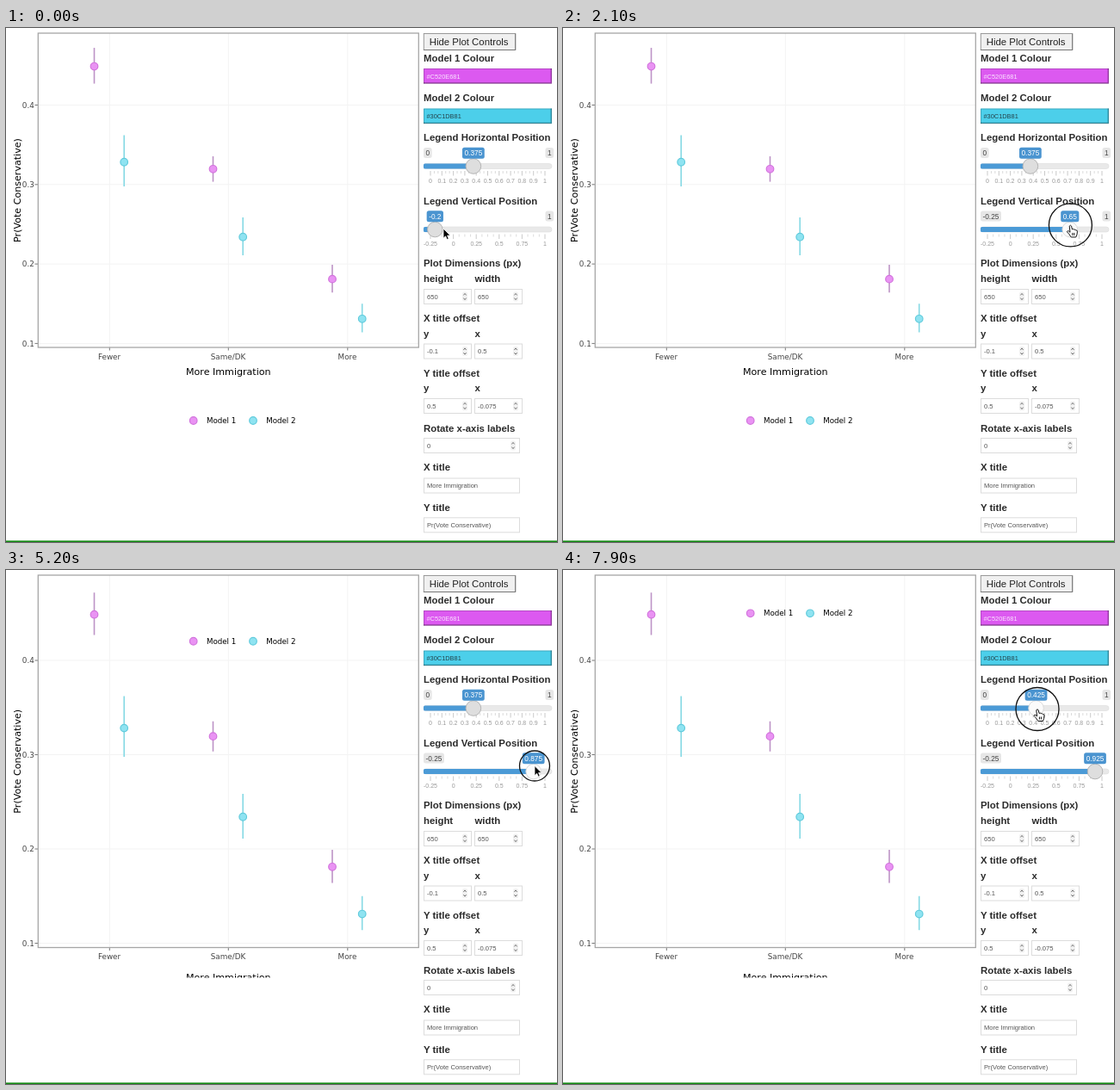
An HTML page for the animation above (8000 ms loop, 640 by 597 pixels).

```html
<!DOCTYPE html>
<html lang="en">
<head>
<meta charset="utf-8">
<title>Plot controls</title>
<style>
  html, body { margin: 0; width: 100%; height: 100%; overflow: hidden; background: #fff; }
  svg { display: block; width: 640px; height: 597px; }
  text { font-family: "Liberation Sans", Arial, sans-serif; }
  .plot text { font-family: "DejaVu Sans", Verdana, sans-serif; }
</style>
</head>
<body>
<svg id="stage" viewBox="0 0 640 597" xmlns="http://www.w3.org/2000/svg"></svg>
<script>
const NS = 'http://www.w3.org/2000/svg';
const LOOP = 8000, STEP = 100;
const stage = document.getElementById('stage');

function set(el, attrs) {
  for (const k in attrs) el.setAttribute(k, attrs[k]);
  return el;
}
function add(parent, tag, attrs) {
  return parent.appendChild(set(document.createElementNS(NS, tag), attrs || {}));
}
const rect = (p, x, y, w, h, fill, more) =>
  add(p, 'rect', { x, y, width: w, height: h, fill, ...more });
const line = (p, x1, y1, x2, y2, stroke, width = 1) =>
  add(p, 'line', { x1, y1, x2, y2, stroke, 'stroke-width': width });
// y is the middle of the capitals
function label(p, str, x, y, size, fill, more) {
  const el = add(p, 'text', { x, y: y + size * 0.36, 'font-size': size, fill, ...more });
  el.textContent = str;
  return el;
}
const MID = { 'text-anchor': 'middle' };
const END = { 'text-anchor': 'end' };
const show = (el, on) => set(el, { visibility: on ? 'visible' : 'hidden' });

// ---------- plot ----------
const CATS = [['Fewer', 120], ['Same/DK', 258], ['More', 396.5]];
const MODELS = [
  { name: 'Model 1', dx: -17.5, key: 217.7, fill: '#e993f3', edge: '#d273dd', bar: '#bd93c6',
    data: [[.4487, .427, .472], [.3195, .3035, .3355], [.181, .164, .199]] },
  { name: 'Model 2', dx: 17.2, key: 287, fill: '#8fe3f1', edge: '#60cbdc', bar: '#86d9e4',
    data: [[.3282, .2977, .362], [.234, .211, .2585], [.131, .114, .150]] }
];

function marker(p, m, x, y) {
  add(p, 'circle', { cx: x, cy: y, r: 4.3, fill: m.fill, stroke: m.edge, 'stroke-width': 1.2 });
}

function makePlot(id, bottom, y4, unit, titleY, cut) {
  const clip = add(stage, 'clipPath', { id });
  rect(clip, 0, 0, 482, cut, '#000');
  const g = add(stage, 'g', { class: 'plot', 'clip-path': `url(#${id})` });
  const yOf = v => y4 - (v - 0.4) * unit;

  for (const [, x] of CATS) line(g, x + .3, 6, x + .3, bottom, '#f3f3f3');
  for (const v of [.1, .2, .3, .4]) {
    const y = yOf(v);
    line(g, 37, y, 479, y, '#f3f3f3');
    line(g, 33.5, y, 37, y, '#777');
    label(g, v.toFixed(1), 32.8, y, 8.8, '#444', END);
  }
  for (const [name, x] of CATS) {
    line(g, x + .3, bottom, x + .3, bottom + 3.5, '#777');
    label(g, name, x, bottom + 10.6, 8.8, '#444', MID);
  }
  rect(g, 37.3, 6, 442, bottom - 6, 'none', { stroke: '#a6a6a6', 'stroke-width': 1.3 });

  for (const m of MODELS) {
    m.data.forEach(([v, lo, hi], i) => {
      const x = CATS[i][1] + m.dx;
      line(g, x, yOf(hi), x, yOf(lo), m.bar, 1.6);
      marker(g, m, x, yOf(v));
    });
  }
  label(g, 'More Immigration', 258.3, titleY, 11.1, '#000', MID);
  const my = (6 + bottom) / 2;
  label(g, 'Pr(Vote Conservative)', 13.3, my, 11.1, '#000',
    { ...MID, transform: `rotate(-90 13.3 ${my})` });
  return g;
}

const tallGap = makePlot('clipA', 371, 89.5, 923, 399, 474);
const overlaid = makePlot('clipB', 438.5, 105, 1095, 472.8, 473.5);

const legend = add(stage, 'g', { class: 'plot' });
for (const m of MODELS) {
  marker(legend, m, m.key, 0);
  label(legend, m.name, m.key + 15.2, 0, 8.7, '#000');
}

// ---------- control panel ----------
const panel = add(stage, 'g');
const heading = (str, y, x = 485) =>
  label(panel, str, x, y, 11.4, '#2b2b2b', { 'font-weight': 'bold' });

function field(x, y, w, str, spin) {
  rect(panel, x + .5, y - 8.5, w - 1, 17, '#fff', { stroke: '#dcdcdc' });
  label(panel, str, x + 4, y + .2, 7.6, '#555');
  if (!spin) return;
  const sx = x + w - 8;
  rect(panel, sx - 3, y - 5.5, 6, 11, '#f1f1f1', { rx: 2 });
  add(panel, 'path', {
    d: `M${sx - 1.6} ${y - 1.6}l1.6 -2 1.6 2M${sx - 1.6} ${y + 1.6}l1.6 2 1.6 -2`,
    fill: 'none', stroke: '#666', 'stroke-width': .9
  });
}

function swatch(title, y, code, fill, ink) {
  heading(title, y);
  rect(panel, 485, y + 12.5, 149, 17.5, fill);
  add(panel, 'path', { d: `M485.5 ${y + 30}V${y + 13}H634`, fill: 'none', stroke: '#000', 'stroke-opacity': .18 });
  add(panel, 'path', { d: `M485 ${y + 29.5}H633.3V${y + 12.5}`, fill: 'none', stroke: '#000', 'stroke-opacity': .35, 'stroke-width': 1.3 });
  label(panel, code, 488.5, y + 21.5, 7.4, ink);
}

rect(panel, 485.3, 6.5, 106.4, 19, '#f0f0f0', { stroke: '#999' });
add(panel, 'path', { d: 'M485 25.5H591.7V6.5', fill: 'none', stroke: '#777' });
label(panel, 'Hide Plot Controls', 491.7, 16.2, 11.4, '#222');
swatch('Model 1 Colour', 34.5, '#C520E681', '#dc59f0', '#fbe6ff');
swatch('Model 2 Colour', 81, '#30C1DB81', '#4ccfea', '#24444c');

heading('Plot Dimensions (px)', 273.3);
heading('X title offset', 337.3);
heading('Y title offset', 400.8);
const pairs = [
  [291.3, 'height', 'width', '650', '650'],
  [354.8, 'y', 'x', '-0.1', '0.5'],
  [418.3, 'y', 'x', '0.5', '-0.075']
];
for (const [y, a, b, va, vb] of pairs) {
  heading(a, y);
  heading(b, y, 544.5);
  field(485, y + 20.7, 56, va, true);
  field(544, y + 20.7, 56, vb, true);
}
heading('Rotate x-axis labels', 464.5);
field(485, 485, 112, '0', true);
heading('X title', 510.3);
field(485, 531.5, 112, 'More Immigration');
heading('Y title', 556.5);
field(485, 577.3, 112, 'Pr(Vote Conservative)');

// ---------- sliders ----------
const widthOf = s => [...s].reduce((w, c) => w + (c === '.' ? .278 : c === '-' ? .333 : .556), 0) * 8.3 + 5;

function tag(x, y, str) {
  const g = add(panel, 'g');
  const w = widthOf(str);
  rect(g, x, y, w, 12, '#e6e6e6', { rx: 2.5 });
  label(g, str, x + w / 2, y + 6.2, 8.3, '#444', MID);
  return g;
}

function makeSlider(title, y, min, step, minors) {
  heading(title, y);
  const mid = y + 33.5, top = y + 12;
  const xOf = v => 493 + 133 * (v - min) / (1 - min);
  const lowStr = String(min), lowEnd = 485 + widthOf(lowStr);
  const low = tag(485, top, lowStr), high = tag(626.5, top, '1');
  rect(panel, 485, mid - 3, 149, 6, '#e9e9e9', { rx: 3, stroke: '#dcdcdc', 'stroke-width': .6 });
  const bar = rect(panel, 485, mid - 3, 10, 6, '#4b9ad6', { rx: 1.5 });

  const count = Math.round((1 - min) / step);
  for (let i = 0; i <= count; i++) {
    const v = min + i * step;
    line(panel, xOf(v), mid + 5.5, xOf(v), mid + 11, '#bbb', .8);
    label(panel, String(+v.toFixed(2)), xOf(v), mid + 16.6, 7, '#999', MID);
    if (i === count) break;
    for (let k = 1; k <= minors; k++) {
      const x = xOf(v + step * k / (minors + 1));
      line(panel, x, mid + 5.5, x, mid + 8.5, '#ccc', .7);
    }
  }
  const knob = add(panel, 'circle', { cy: mid, r: 8.8, 'stroke-width': 1 });
  const bubble = rect(panel, 0, top - .3, 10, 13, '#4a94d0', { rx: 2.5 });
  const value = label(panel, '', 0, top + 6.2, 8.3, '#fff', MID);

  return (v, tip) => {
    const x = xOf(v), str = String(+v.toFixed(3)), w = widthOf(str);
    const near = Math.hypot(tip[0] - x, tip[1] - mid) < 9;
    set(bar, { width: x - 485 });
    set(knob, { cx: x, fill: near ? '#fbfbfb' : '#dedede', stroke: near ? '#dadada' : '#b4b4b4' });
    set(bubble, { x: x - w / 2, width: w });
    set(value, { x });
    value.textContent = str;
    show(low, x - w / 2 > lowEnd);
    show(high, x + w / 2 < 625);
  };
}
const setAcross = makeSlider('Legend Horizontal Position', 127, 0, .1, 2);
const setUp = makeSlider('Legend Vertical Position', 200.5, -.25, .25, 3);

rect(stage, 0, 595.4, 640, 1.6, '#128a12');

// ---------- pointer ----------
const ring = add(stage, 'circle', { fill: 'none', stroke: '#111', 'stroke-width': 1.3 });
const arrow = add(stage, 'path', {
  d: 'M0 0V11.2L2.6 8.8L4.3 12.6L6.2 11.8L4.6 8.1H8.1Z',
  fill: '#000', stroke: '#fff', 'stroke-width': .8
});
const hand = add(stage, 'path', {
  d: 'M-1.2 1.2Q0 -.6 1.2 1.2L2 5Q3.4 4 4.2 5.2Q5.6 4.6 6.2 6Q7.8 5.6 8 7.4L7.6 11L6.4 14H.8L-1.6 10.4L-4 7.8Q-3.4 6 -1.8 7.2L-.4 8.4ZM2.4 9V12M4.4 9V12',
  fill: '#fff', stroke: '#111', 'stroke-width': 1, 'stroke-linejoin': 'round'
});

// ---------- timeline ----------
const path = [
  [0, 508, 233], [400, 501, 231], [600, 501, 231], [1500, 572.5, 230], [2600, 603.5, 228],
  [3000, 603.5, 228], [3100, 606, 228], [3900, 606, 228], [4100, 609.5, 228.5], [4800, 612, 228],
  [5100, 614, 227.5], [5600, 614, 227.5], [6100, 619.2, 227.5], [6500, 619.2, 227.5],
  [7300, 545, 162], [7600, 545, 162], [7800, 551, 161.5]
];
const upKeys = [
  [600, -.2], [1500, .475], [2600, .775], [3000, .775], [3100, .8], [3900, .8], [4100, .85],
  [4900, .85], [5000, .875], [5600, .875], [5700, .9], [6000, .9], [6100, .925]
];
const acrossKeys = [[7600, .375], [7800, .425]];
const legendKeys = [[0, -.2], [3500, .8], [4700, .85], [5500, .875], [6100, .9], [6500, .925]];
const presses = [[500, 3200], [3800, 4400], [4800, 5200], [5500, 5800], [6000, 6200], [7500, 8000]];

function tween(keys, t, i = 1) {
  if (t <= keys[0][0]) return keys[0][i];
  for (let k = 1; k < keys.length; k++) {
    const a = keys[k - 1], b = keys[k];
    if (t < b[0]) return a[i] + (b[i] - a[i]) * (t - a[0]) / (b[0] - a[0]);
  }
  return keys[keys.length - 1][i];
}
const hold = (keys, t) => keys.filter(k => k[0] <= t).pop()[1];
const snap = v => Math.round(v * 40) / 40;

function render(t) {
  const tip = [tween(path, t, 1), tween(path, t, 2)];
  const at = `translate(${tip[0]} ${tip[1]})`;
  const press = presses.find(([a, b]) => t >= a && t < b + STEP);
  const held = !!press && t >= press[0] + STEP && t < press[1];

  setAcross(snap(tween(acrossKeys, t)), tip);
  setUp(snap(tween(upKeys, t)), tip);

  const v = hold(legendKeys, t), over = v > 0;
  show(tallGap, !over);
  show(overlaid, over);
  const y = over ? 450.8 - v * 433 : 383 - v * 365;
  set(legend, { transform: `translate(0 ${y})` });

  set(ring, { cx: tip[0], cy: tip[1], r: held ? 25 : 17.5 });
  show(ring, press);
  show(set(hand, { transform: at }), held);
  show(set(arrow, { transform: at }), !held);
}

const start = performance.now();
function tick() {
  const t = (performance.now() - start) % LOOP;
  render(Math.floor(t / STEP) * STEP);
  requestAnimationFrame(tick);
}
tick();
</script>
</body>
</html>
```
